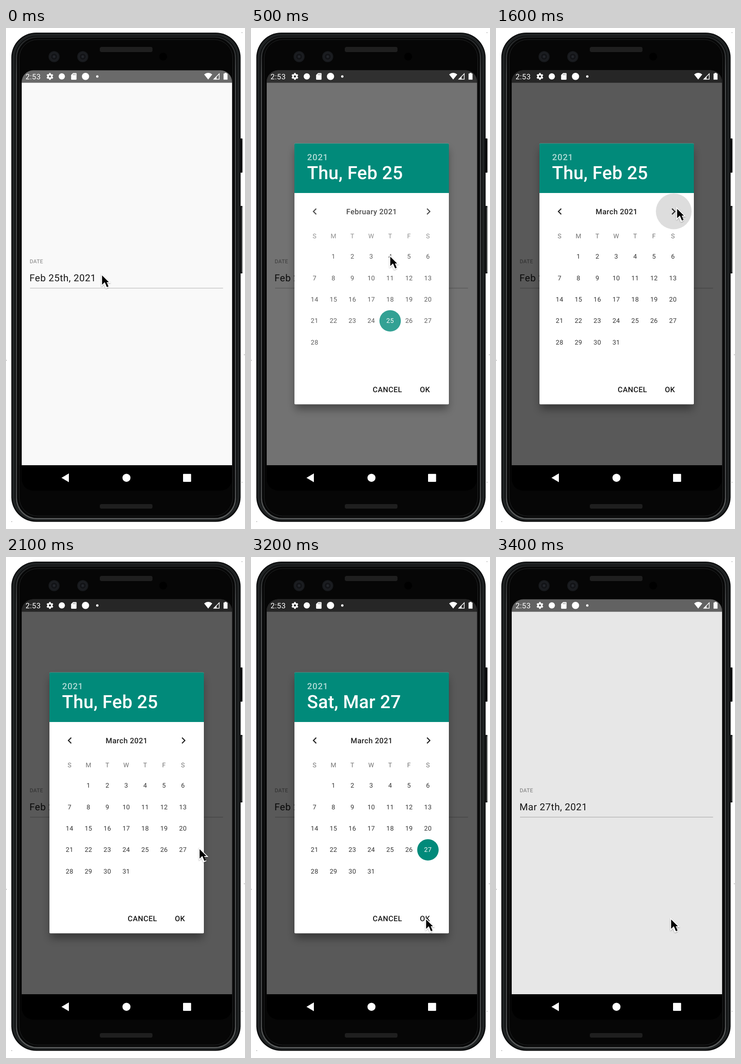
Recreate the animation shown at these times as an HTML page. Size 517 by 1084 pixels, loop 3.5 s.

```html
<!DOCTYPE html>
<html lang="en">
<head>
<meta charset="utf-8">
<title>Date picker</title>
<style>
html, body { margin: 0; width: 100%; height: 100%; overflow: hidden; background: #fff; }
svg { display: block; width: 100vw; height: 100vh; }
text {
  font-family: Roboto, sans-serif;
  white-space: pre;
  letter-spacing: .025em;
  text-rendering: geometricPrecision;
}
.bold { font-weight: 500; }
.mid { text-anchor: middle; }
.day { font-size: 13.9px; fill: #333; }
.week { font-size: 13.9px; fill: #757575; }
.title { font-size: 16.2px; fill: #212121; }
.btn { font-size: 16.2px; fill: #1a1a1a; }
#year { font-size: 18.5px; letter-spacing: .05em; }
#head { font-size: 39.37px; letter-spacing: .005em; }
</style>
</head>
<body>
<svg viewBox="0 0 517 1084" preserveAspectRatio="none">
  <defs>
    <linearGradient id="rim" x1="0" y1="0" x2="0" y2="1">
      <stop offset="0" stop-color="#222425"/>
      <stop offset=".08" stop-color="#4a4c4d"/>
      <stop offset=".93" stop-color="#4a4c4d"/>
      <stop offset="1" stop-color="#5c5e5e"/>
    </linearGradient>
    <radialGradient id="lens">
      <stop offset="0" stop-color="#2c2f36"/>
      <stop offset=".4" stop-color="#0f1013"/>
      <stop offset=".65" stop-color="#1d1f23"/>
      <stop offset="1" stop-color="#15171a"/>
    </radialGradient>
    <pattern id="mesh" width="3" height="3" patternUnits="userSpaceOnUse">
      <rect width="3" height="3" fill="#242424"/>
      <circle cx="1.5" cy="1.5" r=".9" fill="#121212"/>
    </pattern>
    <filter id="soft" x="-20%" y="-20%" width="140%" height="140%">
      <feGaussianBlur stdDeviation="9"/>
    </filter>
    <filter id="drop" x="-50%" y="-50%" width="200%" height="200%">
      <feDropShadow dx="0" dy="1" stdDeviation=".8" flood-color="#000" flood-opacity=".4"/>
    </filter>
    <clipPath id="screen"><rect x="34" y="91.6" width="455" height="909.4" rx="25"/></clipPath>
    <clipPath id="pager"><rect x="94" y="357" width="334" height="390"/></clipPath>
  </defs>

  <!-- phone -->
  <rect x="505" y="239" width="6.5" height="74" rx="1" fill="#0c0d0e"/>
  <rect x="505" y="385" width="6.5" height="146" rx="1" fill="#1a1c1d"/>
  <path d="M510.5 388V528" stroke="#6d6f70"/>
  <rect x="11.5" y="10" width="496" height="1058.5" rx="54" fill="#0b0c0d"/>
  <g fill="none">
    <rect x="16.5" y="14.5" width="486" height="1049" rx="50" stroke="#1f2223" stroke-width="5"/>
    <rect x="22.5" y="19.5" width="474" height="1042" rx="45" stroke="url(#rim)" stroke-width="2.4"/>
  </g>
  <rect x="25" y="21.5" width="469" height="1038" rx="43" fill="#060606"/>
  <rect x="28.5" y="25" width="462" height="1031" rx="40" fill="none" stroke="#242627"/>
  <rect x="203" y="41" width="114" height="11" rx="4" fill="url(#mesh)"/>
  <rect x="203" y="1030" width="114" height="10" rx="4" fill="url(#mesh)"/>
  <circle cx="104" cy="62" r="12" fill="url(#lens)"/>
  <circle cx="166" cy="62" r="12" fill="url(#lens)"/>
  <circle cx="340" cy="62" r="8.5"/>
  <path d="M510 10h1M515 707h1M510 983h1M0 719h1M12 1068h1" stroke="#222"/>

  <!-- app -->
  <g clip-path="url(#screen)">
    <rect x="34" y="91" width="455" height="910"/>
    <rect x="34" y="118" width="455" height="828" fill="#f9f9f9"/>
    <rect x="34" y="91" width="455" height="27.5" fill="#6a6a6a"/>
    <text x="51.3" y="509" font-size="11.6" fill="#808080">DATE</text>
    <g id="field">
      <text id="value" x="50.8" y="547.8" font-size="20.84" fill="#161616"></text>
      <path d="M52 562.8H469.5" stroke="#bdbdbd" stroke-width="1.2"/>
    </g>
    <rect id="dim" x="34" y="91" width="455" height="855"/>
  </g>

  <!-- status and navigation icons -->
  <g fill="#fff">
    <text x="42.3" y="110.8" font-size="16.2">2:53</text>
    <g transform="translate(95 104.8)">
      <circle r="4.1" fill="none" stroke="#fff" stroke-width="3.4"/>
      <g id="teeth"></g>
    </g>
    <circle cx="120.7" cy="104.7" r="6.8"/>
    <path d="M145 97.5h6.3a1.3 1.3 0 0 1 1.3 1.3v11.8a1.3 1.3 0 0 1-1.3 1.3h-9.2a1.3 1.3 0 0 1-1.3-1.3v-8.9z"/>
    <path d="M145.3 99.5v2.6M147.6 99.5v2.6M149.9 99.5v2.6" stroke="#777"/>
    <circle cx="172" cy="104.8" r="7.8"/>
    <circle cx="197.5" cy="104.8" r="2.6"/>
    <path d="M437.4 111.5L428.6 100.4Q437.4 93.6 446.2 100.4Z"/>
    <path d="M449.5 110.8L461.3 99V110.8Z" fill="none" stroke="#fff" stroke-width="1.4"/>
    <path d="M449 111.3l6.5-6.5v6.5z"/>
    <path d="M473 97h4v1.5h2.2v13.3h-8.6V98.5h2.4z"/>
    <path d="M120 973.2L136 963.7V982.7Z"/>
    <circle cx="260.6" cy="973.2" r="8.7"/>
    <rect x="383" y="964.8" width="17.4" height="17.2" rx="1.2"/>
  </g>

  <!-- dialog -->
  <g id="dialog">
    <rect x="96" y="262" width="330" height="563" rx="4" filter="url(#soft)" opacity=".37"/>
    <rect x="94" y="249.7" width="334" height="564.6" rx="2" fill="#fff"/>
    <path d="M94 357V251.7a2 2 0 0 1 2-2h330a2 2 0 0 1 2 2V357Z" fill="#018a7a"/>
    <text id="year" class="bold" x="121.5" y="285.5" fill="#fff" opacity=".7">2021</text>
    <text id="head" class="bold" x="121.3" y="327" fill="#fff"></text>
    <g id="calendar">
      <circle id="ripple" cx="384.5" cy="396.8" r="38.7"/>
      <g clip-path="url(#pager)"><g id="feb"></g><g id="mar"></g></g>
      <g fill="#262626">
        <path transform="translate(124.1 383.1) scale(1.158)" d="M15.41 7.41L14 6l-6 6 6 6 1.41-1.41L10.83 12z"/>
        <path transform="translate(370 383.1) scale(1.158)" d="M10 6L8.59 7.41 13.17 12l-4.58 4.59L10 18l6-6z"/>
      </g>
    </g>
    <text class="btn bold" x="263.2" y="788.3">CANCEL</text>
    <text class="btn bold" x="365.2" y="788.3">OK</text>
  </g>

  <g id="cursor" filter="url(#drop)">
    <g transform="scale(1.8) translate(-8.2 -4.9)">
      <path d="M8.2 20.9V4.9L19.8 16.5H13L12.6 16.6Z" fill="#fff"/>
      <path d="M17.3 21.6L13.7 23.1L9 12L12.7 10.5Z" fill="#fff"/>
      <path d="M11.9 14L13.75 13.2L16.85 20.6L15 21.4Z"/>
      <path d="M9.2 7.3V18.5L12.2 15.6L12.6 15.5H17.4Z"/>
    </g>
  </g>
</svg>
<script>
const $ = id => document.getElementById(id);
const NS = 'http://www.w3.org/2000/svg';
const STEP = 100, STEPS = 35, PAGE = 334;

function add(parent, tag, attrs, text) {
  const el = document.createElementNS(NS, tag);
  for (const k in attrs) el.setAttribute(k, attrs[k]);
  if (text !== undefined) el.textContent = text;
  parent.append(el);
  return el;
}

for (let a = 0; a < 360; a += 60)
  add($('teeth'), 'rect', { x: -1.7, y: -7.4, width: 3.4, height: 3.6, transform: `rotate(${a})` });

// Both months begin on a Monday.
function buildMonth(group, name, days, chosen) {
  const colX = c => 137.5 + 40.87 * c;
  const rowY = r => 494.3 + 46.35 * r;
  add(group, 'text', { class: 'title bold mid', x: 261, y: 402.7 }, name);
  [...'SMTWTFS'].forEach((d, c) => add(group, 'text', { class: 'week mid', x: colX(c), y: 455 }, d));
  let mark;
  for (let d = 1; d <= days; d++) {
    const x = colX(d % 7), y = rowY(Math.floor(d / 7));
    if (d === chosen) mark = add(group, 'circle', { cx: x, cy: y + .3, r: 23.2, fill: '#018a7a' });
    const label = add(group, 'text', { class: 'day mid', x, y: y + 4.9 }, d);
    if (d === chosen) mark.label = label;
  }
  return mark;
}
buildMonth($('feb'), 'February 2021', 28, 25).label.style.fill = '#fff';
const pick = buildMonth($('mar'), 'March 2021', 31, 27);

// Each row: step, value(s)
const dim = [[0, 0], [3, .1], [4, .32], [5, .54], [6, .645], [33, .47], [34, .075]];
const panel = [[0, 0], [3, .2], [4, .71], [5, 1], [33, .49], [34, 0]];
const inner = [[0, 0], [4, .39], [5, .8], [6, 1]];
const press = [[0, 1], [1, .3], [3, .6], [4, 1]];
const ripple = [[0, 0], [15, .1], [16, .135], [17, .06], [18, 0]];
const slide = [[0, 0], [15, .6], [16, 1]];
const path = [
  [0, 206, 531], [3, 206, 531], [4, 229, 531], [6, 370, 450], [8, 465, 390],
  [9, 463, 388], [10, 437, 387], [12, 390, 387], [17, 390, 387], [19, 400, 667],
  [20, 400, 636], [21, 417, 628], [23, 393, 612], [28, 393, 612],
  [31, 377, 780], [35, 377, 780]
];

const hold = (rows, n) => rows.filter(r => r[0] <= n).pop()[1];

function along(n) {
  const i = path.findIndex(p => p[0] > n);
  const [a, x0, y0] = path[i - 1], [b, x1, y1] = path[i];
  const k = (n - a) / (b - a);
  return [x0 + (x1 - x0) * k, y0 + (y1 - y0) * k];
}

function draw(n) {
  const chosen = n >= 27;
  $('value').textContent = n >= 33 ? 'Mar 27th, 2021' : 'Feb 25th, 2021';
  $('head').textContent = chosen ? 'Sat, Mar 27' : 'Thu, Feb 25';
  $('field').style.opacity = hold(press, n);
  $('dim').style.opacity = hold(dim, n);
  $('dialog').style.opacity = hold(panel, n);
  $('calendar').style.opacity = hold(inner, n);
  $('ripple').style.opacity = hold(ripple, n);
  pick.style.opacity = chosen ? 1 : 0;
  pick.label.style.fill = chosen ? '#fff' : '#333';
  const shift = hold(slide, n) * PAGE;
  $('feb').setAttribute('transform', `translate(${-shift} 0)`);
  $('mar').setAttribute('transform', `translate(${PAGE - shift} 0)`);
  $('cursor').setAttribute('transform', `translate(${along(n)})`);
}

let start, last = 0;
function tick(now) {
  start ??= now;
  const n = Math.floor((now - start) / STEP) % STEPS;
  if (n !== last) draw(last = n);
  requestAnimationFrame(tick);
}
draw(0);
requestAnimationFrame(tick);
</script>
</body>
</html>
```
